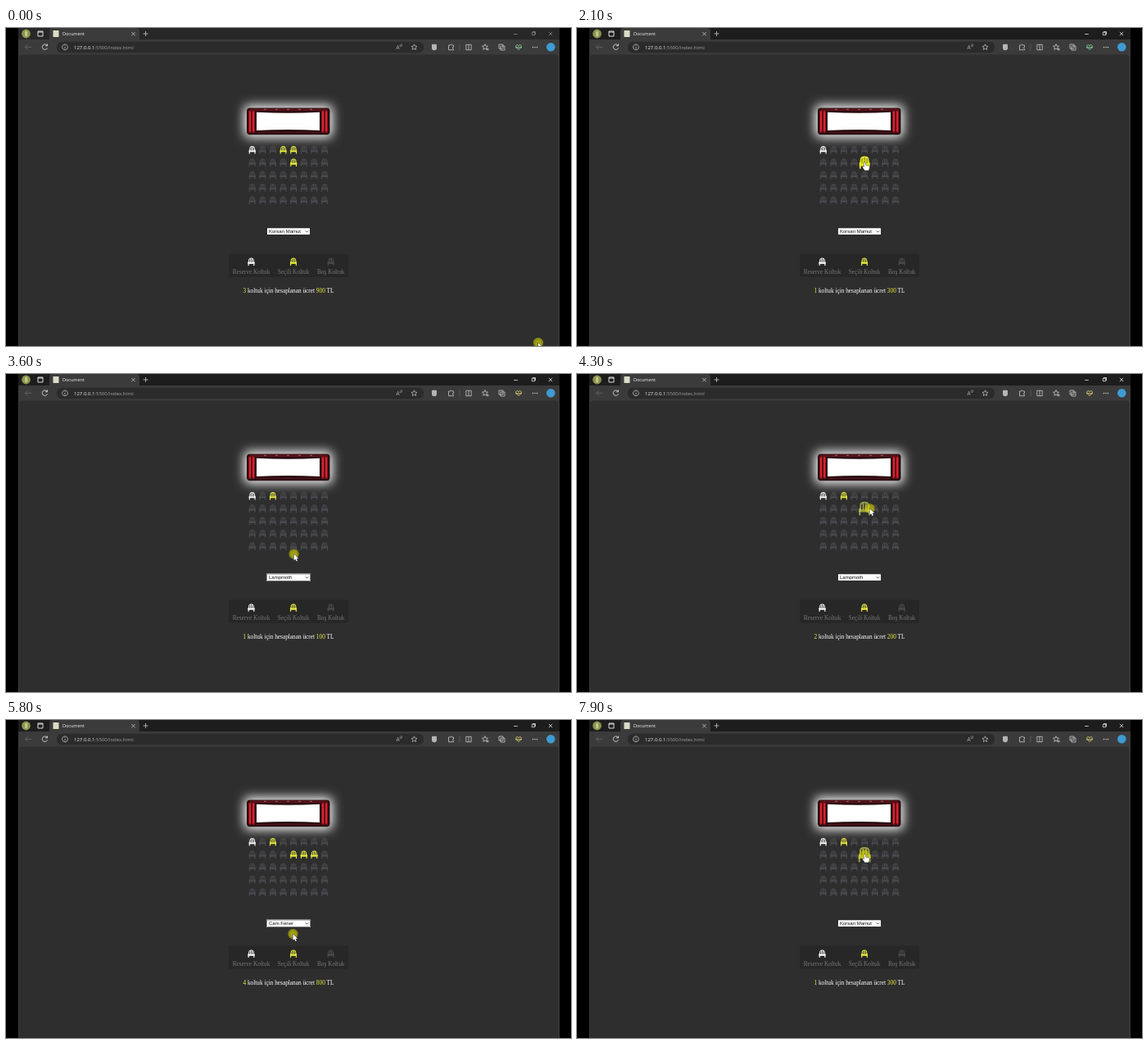
These frames come from a looping animation (690x388 px, 8 s). An HTML page with a canvas:

```html
<!DOCTYPE html>
<html lang="tr">
<head>
<meta charset="utf-8">
<title>Document</title>
<style>
  html, body { margin: 0; width: 100%; height: 100%; overflow: hidden; background: #000; }
  canvas { display: block; width: 690px; height: 388px; }
</style>
</head>
<body>
<canvas id="stage"></canvas>
<script>
const W = 690, H = 388, LOOP = 8000, STEP = 100, TRAVEL = 400;
const canvas = document.getElementById('stage');
const ctx = canvas.getContext('2d');
const dpr = window.devicePixelRatio || 1;
canvas.width = W * dpr;
canvas.height = H * dpr;

const SANS = '"Open Sans", "Noto Sans", sans-serif';
const ARIAL = '"Liberation Sans", Arial, sans-serif';
const SERIF = '7.3px "Liberation Serif", "Times New Roman", serif';
const PAGE = '#2e2e2e', BAR = '#3b3b3b', YELLOW = '#ebef40', FREE = '#4b4b51', WHITE = '#fff';
const ROWS = 5, COLS = 8, GAP_X = 12.62, GAP_Y = 15.35, LEFT = 300.7, TOP = 148.8;
const RESERVED = '0,0';

const films = [
  { name: 'Korsan Mamut', price: 300 },
  { name: 'Lampmoth', price: 100 },
  { name: 'Cam Fener', price: 200 }
];

// The visit: when the pointer is done at a place, and what it does there.
const at = (time, spot, action) => ({ time, ...spot, action });
const spot = (x, y) => ({ x, y });
const seatSpot = (r, c, dx = 0, dy = 0) =>
  ({ x: LEFT + GAP_X * c + dx, y: TOP + GAP_Y * r + dy, key: r + ',' + c });
const corner = spot(650, 384), edge = spot(630, 350);
const list = spot(349, 247), option = spot(352, 275);

const visit = [
  at(0, corner), at(300, corner), at(400, edge), at(500, edge),
  at(1300, seatSpot(0, 3), 'toggle'),
  at(1700, seatSpot(0, 4), 'toggle'),
  at(2400, seatSpot(1, 4), 'toggle'),
  at(3000, seatSpot(0, 2, -2.4, 18), 'toggle'),
  at(3400, option, 'pick'),
  at(4200, seatSpot(1, 4), 'toggle'),
  at(4400, seatSpot(1, 5), 'toggle'),
  at(4600, seatSpot(1, 6), 'toggle'),
  at(5200, list),
  at(5600, option, 'pick'),
  at(6000, list, 'pick'),
  at(6400, spot(384, 320)), at(6700, spot(358, 286)),
  at(7200, seatSpot(1, 6), 'toggle'),
  at(7500, seatSpot(1, 5), 'toggle'),
  at(7800, seatSpot(1, 4), 'toggle')
];

const smooth = p => p * p * (3 - 2 * p);

function cursorAt(t) {
  const i = visit.findIndex(v => v.time > t);
  if (i < 1) return visit[visit.length - 1];
  const a = visit[i - 1], b = visit[i];
  const e = smooth(Math.min(1, (t - a.time) / Math.min(TRAVEL, b.time - a.time)));
  return { x: a.x + (b.x - a.x) * e, y: a.y + (b.y - a.y) * e };
}

function stateAt(t) {
  const picked = new Set(['0,3', '0,4', '1,4']);
  let picks = 0, focus = false, active = false;
  for (const { time, key, action } of visit) {
    if (time > t) break;
    if (!action) continue;
    active = true;
    focus = action === 'pick';
    if (focus) picks++;
    else if (!picked.delete(key)) picked.add(key);
  }
  const shift = picked.size ? 0 : GAP_Y;
  const cursor = cursorAt(t);
  const x = (cursor.x - LEFT) / GAP_X, y = (cursor.y - shift - TOP) / GAP_Y;
  const c = Math.round(x), r = Math.round(y);
  const inside = c >= 0 && c < COLS && r >= 0 && r < ROWS &&
    Math.abs(x - c) < 0.4 && Math.abs(y - r) < 0.4;
  const key = r + ',' + c;
  const hover = inside && key !== RESERVED ? key : '';
  return { t, picked, focus, active, shift, cursor, hover, film: films[picks % films.length] };
}

function rect(x, y, w, h, fill, r = 0) {
  ctx.fillStyle = fill;
  ctx.beginPath();
  ctx.roundRect(x, y, w, h, r);
  ctx.fill();
}

function dot(x, y, r, fill) {
  ctx.fillStyle = fill;
  ctx.beginPath();
  ctx.arc(x, y, r, 0, 7);
  ctx.fill();
}

function text(str, x, y, font, fill) {
  ctx.font = font;
  ctx.fillStyle = fill;
  ctx.fillText(str, x, y);
  return x + ctx.measureText(str).width;
}

function icon(d, x, y, stroke = '#c8c8c8', width = 0.8) {
  ctx.save();
  ctx.translate(x, y);
  ctx.strokeStyle = stroke;
  ctx.lineWidth = width;
  ctx.stroke(new Path2D(d));
  ctx.restore();
}

const star = () => 'M' + Array.from({ length: 10 }, (_, i) => {
  const a = i * Math.PI / 5, r = i % 2 ? 1.7 : 3.7;
  return (r * Math.sin(a)).toFixed(2) + ' ' + (-r * Math.cos(a)).toFixed(2);
}).join('L') + 'Z';
const square = s => `M${-s} ${-s}H${s}V${s}H${-s}Z`;
const CROSS = 'M-2.2-2.2L2.2 2.2M2.2-2.2L-2.2 2.2';
const HEART = 'M0 3L-3 0C-4-3-1-4 0-1.6C1-4 4-3 3 0ZM-4 .3H4';

function browser({ t, active }) {
  const control = active ? '#e4e4e4' : '#858585';
  rect(0, 0, W, H, '#000');
  rect(15, 0, 661, 16, active ? '#1d1d1d' : '#272727');
  rect(53, 0, 110, 16, BAR, [4, 4, 0, 0]);
  rect(15, 14, 661, H, BAR);
  rect(16, 32.5, 658.5, H, PAGE, [4, 4, 0, 0]);

  dot(24.5, 7, 5.4, '#8c934c');
  rect(23, 3.5, 3.2, 7, '#c3c48c', 1.5);
  icon(square(3) + 'M-3-2H3', 42, 7, '#dedede', 1);
  rect(57.5, 3, 7, 8, '#dcdcc8', 0.5);
  text('Document', 69, 9.3, '5.5px ' + SANS, '#f4f4f4');
  icon(CROSS, 155.5, 7.2);
  icon('M-3 0H3M0-3V3', 170.5, 7);
  icon('M-2.3 0H2.3', 622.5, 7.5, control);
  icon(square(1.7) + 'M-1-2.5H2.5V1', 644, 7, control);
  icon(CROSS, 665, 7, control);

  icon('M4 0H-4M-1-3L-4 0L-1 3', 27.5, 23.3, '#6c6c6c');
  icon('M3 1A3.2 3.2 0 1 1 2.5-2.1M3-3.8V-1.5H.7', 47.5, 23.3, '#d8d8d8', 0.9);
  rect(62, 16.8, 448, 13.4, '#2b2b2b', 6);
  icon('M3.4 0A3.4 3.4 0 1 1 3.4-.1M0-.5V2M0-2V-1.3', 72, 23.4);
  const x = text('127.0.0.1', 83, 25.6, '6px ' + SANS, '#f0f0f0');
  text(':5500/index.html', x, 25.6, '6px ' + SANS, '#a2a2a2');
  text('A', 476.5, 26, '6.5px ' + SANS, '#b0b0b0');
  icon('M0-2Q1.5-1 0 1M1.5-3Q4-1 1.5 1', 481, 22, '#b0b0b0', 0.6);
  icon(star(), 498.5, 23.5, '#b8b8b8');

  rect(520, 19.8, 6, 7.4, '#b5b5b5', [1, 1, 3, 3]);
  icon('M-3-2.5H-1Q0-5 1-2.5H3V0Q0 .5 3 2V3.2H-3Z', 543.5, 23.5);
  icon('M0-4V4', 554, 23.5, '#606060');
  icon(square(3.2) + 'M0-3V3', 565, 23.5);
  icon(star() + 'M2 2H4.5M2 3.4H4.5', 585, 23.3);
  icon(square(2.5), 604.5, 22.5);
  icon(square(2.5), 606.5, 24.5);
  icon(HEART, 626, 23.5, t < 3000 ? '#86cf91' : '#d8c66c', 1);
  for (let i = -1; i < 2; i++) dot(646 + i * 2.5, 23.5, 0.75, '#d0d0d0');
  dot(665.3, 23.3, 5.3, '#3f9bd3');
}

function screen() {
  ctx.save();
  ctx.shadowColor = WHITE;
  ctx.shadowBlur = 13 * dpr;
  ctx.shadowOffsetX = 1000 * dpr;
  rect(291 - 1000, 94.5, 107.5, 39, WHITE, 5);
  ctx.restore();

  rect(294, 97.6, 101.5, 32.6, '#260c0e', 4);
  rect(297, 98.2, 96, 3, '#541319', 2);
  for (let i = 0; i < 5; i++) rect(315 + i * 14, 98.8, 3, 0.9, '#b5646a');
  for (const x of [296.2, 385.2]) {
    for (let i = 0; i < 2; i++) {
      rect(x + i * 4.2, 100.5, 3.6, 27.5, '#7a0d16', 1);
      rect(x + 0.7 + i * 4.2, 101.5, 2.1, 25, '#d92433', 0.8);
    }
  }
  ctx.fillStyle = WHITE;
  ctx.fill(new Path2D('M306 102.7Q344.5 105 383 102.7V125Q344.5 123 306 125Z'));
  rect(305, 126.5, 79, 2, '#451016', 1);
}

function seat(x, y, color, scale = 1, alpha = 1) {
  ctx.save();
  ctx.translate(x, y);
  ctx.scale(scale, scale);
  ctx.globalAlpha = alpha;
  ctx.strokeStyle = color;
  ctx.lineWidth = 1;
  ctx.stroke(new Path2D('M-2.8 1V-2.2Q-2.8-4.3 0-4.3Q2.8-4.3 2.8-2.2V1M-.9 1V-4M.9 1V-4'));
  rect(-4, 0.6, 8, 1.9, color, 0.4);
  for (const side of [-3.9, 2.8]) rect(side, -0.3, 1.1, 5.1, color, 0.3);
  ctx.restore();
}

// Share of recent states that pass a test: works like a CSS transition.
const share = (states, test) => states.filter(test).length / states.length;

function seats(t) {
  const past = Array.from({ length: 6 }, (_, i) => stateAt(Math.max(0, t - 45 * i)));
  const all = [];
  for (let i = 0; i < ROWS * COLS; i++) {
    const { x, y, key } = seatSpot(Math.floor(i / COLS), i % COLS);
    const scale = 1 + 0.9 * share(past, s => s.hover === key);
    all.push({ x, y, key, scale, yellow: share(past, s => s.picked.has(key)) });
  }
  all.sort((a, b) => a.scale - b.scale);
  for (const { x, y, key, scale, yellow } of all) {
    if (yellow < 1) seat(x, y, key === RESERVED ? WHITE : FREE, scale);
    if (yellow > 0) seat(x, y, YELLOW, scale, yellow);
  }
}

function picker({ focus, film }) {
  if (focus) {
    rect(318, 243.2, 54, 9.8, '#d8d8d8', 1);
    rect(318.6, 243.8, 52.8, 8.6, '#151515', 0.8);
  }
  rect(319, 244.2, 52, 7.9, WHITE, 0.5);
  text(film.name, 321, 250.2, '6px ' + ARIAL, '#111');
  icon('M-1.7-.8L0 .9L1.7-.8', 367.5, 248.2, '#222');
}

function legend() {
  rect(272, 275.5, 146, 28.5, '#272727', 2);
  const items = [['Reserve Koltuk', 299.5, WHITE], ['Seçili Koltuk', 351, YELLOW], ['Boş Koltuk', 396.7, FREE]];
  ctx.textAlign = 'center';
  for (const [label, x, color] of items) {
    seat(x, 285.2, color);
    text(label, x, 300, SERIF, '#77777a');
  }
  ctx.textAlign = 'left';
}

function total(count, price) {
  const parts = [String(count), ' koltuk için hesaplanan ücret ', String(count * price), ' TL'];
  ctx.font = SERIF;
  let x = 345 - ctx.measureText(parts.join('')).width / 2;
  parts.forEach((part, i) => { x = text(part, x, 322.6, SERIF, i % 2 ? WHITE : YELLOW); });
}

function pointer({ cursor: { x, y }, hover }) {
  const glow = ctx.createRadialGradient(x, y, 3, x, y, 6.5);
  glow.addColorStop(0, 'rgba(222,222,0,0.65)');
  glow.addColorStop(1, 'rgba(222,222,0,0.4)');
  dot(x, y, 6.2, glow);
  ctx.save();
  ctx.translate(x, y);
  const shape = new Path2D(hover
    ? 'M-.6 0Q.4-.9 1.2 0V3.2L5 4.2Q6 4.6 5.8 6L5 9.6H.4L-2.3 6Q-2.6 4.6-.6 5.6Z'
    : 'M0 0V7.8L1.8 6.2L3.1 9L4.4 8.4L3.2 5.7H5.6Z');
  ctx.strokeStyle = '#222';
  ctx.lineWidth = 0.9;
  ctx.stroke(shape);
  ctx.fillStyle = WHITE;
  ctx.fill(shape);
  ctx.restore();
}

function draw(t) {
  const state = stateAt(t);
  ctx.setTransform(dpr, 0, 0, dpr, 0, 0);
  browser(state);
  ctx.save();
  ctx.translate(0, state.shift);
  screen();
  seats(t);
  picker(state);
  legend();
  if (state.picked.size) total(state.picked.size, state.film.price);
  ctx.restore();
  pointer(state);
}

const start = performance.now();
function tick() {
  const t = (performance.now() - start) % LOOP;
  draw(Math.floor(t / STEP) * STEP);
  requestAnimationFrame(tick);
}
tick();
</script>
</body>
</html>
```
